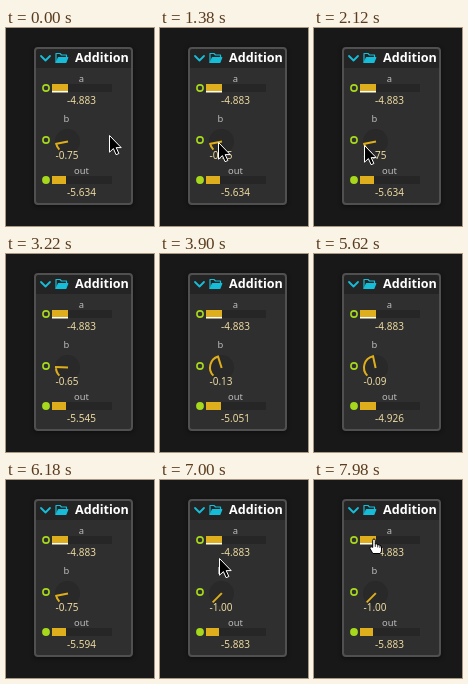
Recreate the animation shown at these times as an HTML page. Size 148x198 px, loop 8000 ms.

```html
<!DOCTYPE html>
<html lang="en">
<head>
<meta charset="utf-8">
<title>Addition node</title>
<style>
  html, body { margin: 0; width: 100%; height: 100%; overflow: hidden; background: #181818; }
  svg { display: block; width: 100vw; height: 100vh; }
  text { font: 10px "Noto Sans", "Open Sans", sans-serif; text-anchor: middle; }
  .label { font-size: 9.4px; fill: #bdbdbd; }
  .title { font-size: 12.6px; font-weight: 700; text-anchor: start; fill: #fff; }
  .value { fill: #ecd9a0; }
  .track { fill: #262626; }
  .fill { fill: #dfae1c; }
  .socket { fill: none; stroke: #a6d91b; stroke-width: 1.6; }
  .icon { fill: none; stroke: #16bdd8; stroke-width: 1.2; stroke-linejoin: round; stroke-linecap: round; }
  .solid { fill: #16bdd8; }
  .dial { fill: none; stroke: #dfae1c; stroke-width: 2; }
</style>
</head>
<body>
<svg viewBox="0 0 148 198">
  <defs>
    <filter id="blur" x="-20%" y="-20%" width="140%" height="140%">
      <feGaussianBlur stdDeviation="2.5"/>
    </filter>
  </defs>
  <rect width="148" height="198" fill="#181818"/>
  <rect x="28" y="20" width="99" height="158" rx="3" opacity=".45" filter="url(#blur)"/>
  <rect x="29" y="20" width="97" height="156" rx="3" fill="#2f2f2f"/>
  <path d="M29 40V22q0-2 2-2h93q2 0 2 2v18z" fill="#242424"/>
  <rect x="29" y="20" width="97" height="156" rx="3" fill="none" stroke="#505050" stroke-width="2"/>

  <path class="icon" style="stroke-width:1.8" d="M35 28l4.500 4.500 4.500-4.500"/>
  <path class="icon" d="M50 34.500v-9h4l1.500 1.500h5v2"/>
  <path class="icon solid" d="M50.200 34.500l2.300-5h9.300l-2 5z"/>
  <text class="title" x="69" y="34">Addition</text>

  <circle class="socket" cx="40" cy="60" r="3.100"/>
  <text class="label" x="75.500" y="54">a</text>
  <rect class="track" x="46" y="56" width="60" height="8"/>
  <rect class="fill" x="46" y="56" width="16" height="8"/>
  <rect x="46" y="63" width="16" height="1.500" fill="#fff"/>
  <text class="value" x="75.500" y="76">-4.883</text>

  <circle class="socket" cx="40" cy="112" r="3.100"/>
  <text class="label" x="60.500" y="94">b</text>
  <circle cx="61.500" cy="113.500" r="12.500" fill="#292929"/>
  <path class="dial" id="dial"/>
  <text class="value" id="bText" x="61" y="131"></text>

  <circle class="socket" cx="40" cy="152" r="3.100" style="fill:#a6d91b"/>
  <text class="label" x="75.500" y="146">out</text>
  <rect class="track" x="46" y="148" width="60" height="8"/>
  <rect class="fill" id="outBar" x="46" y="148" height="8"/>
  <text class="value" id="outText" x="75.500" y="168"></text>

  <path id="arrow" d="M.5 .5v16.700l3.900-3.600 2.700 6.100 2.800-1.200-2.700-5.900h5z"
        fill="#000" stroke="#fff" stroke-linejoin="round"/>
  <g id="hand" stroke="#000" stroke-linejoin="round" stroke-linecap="round">
    <path d="M-1.300 8V1.300Q-1.300 0 0 0t1.300 1.300V5q2.200-.8 2.400 .8 2-.6 2.200 .9 1.600-.2 1.600 1.300v3q0 2-1.300 3.500H-1.200L-4 9.500q-.4-1.600 .8-1.700z" fill="#fff"/>
    <path d="M1.300 5v2.500M3.700 6v2M5.900 7v1.500" stroke-width=".8"/>
  </g>
</svg>
<script>
const LOOP = 8000, A = -4.883, LAG = 40, CENTER = 61.5, MIDDLE = 113.5;
const $ = id => document.getElementById(id);
const clamp01 = p => Math.min(1, Math.max(0, p));
const progress = (t, from, to) => clamp01((t - from) / (to - from));
const ease = (p, soft) => p - soft * Math.sin(2 * Math.PI * p);
const mix = (a, b, p) => a + (b - a) * p;

// Pointer moves after the opening swing: start, end, x, y
const moves = [
  [700, 1000, 50, 112], [1220, 1380, 58, 114], [1640, 2120, 49.5, 117],
  [2520, 2640, 53, 116], [6700, 7260, 63, 48], [7660, 7980, 60, 59]
];

function pointer(t) {
  const p = progress(t, 0, 420);
  let x = 103 - 25 * p - 40 * Math.sin(Math.PI * p) ** 2;
  let y = 106 + 3 * p + 37 * Math.sin(2 * Math.PI * p);
  for (const [from, to, endX, endY] of moves) {
    const q = ease(progress(t, from, to), .08);
    x = mix(x, endX, q);
    y = mix(y, endY, q);
  }
  return [x, y];
}

// The dial is dragged up once, then down to its minimum.
function dialValue(t) {
  const up = mix(-.751, .471, ease(progress(t, 2880, 4900), .095));
  return mix(up, -1, ease(progress(t, 5060, 6460), .032));
}

const polar = (r, angle) =>
  `${(CENTER + r * Math.cos(angle)).toFixed(2)} ${(MIDDLE + r * Math.sin(angle)).toFixed(2)}`;

function drawDial(b) {
  const start = Math.PI * .75, sweep = (b + 1) * start, end = start + sweep;
  $('dial').setAttribute('d',
    `M${polar(11.5, start)}A11.5 11.5 0 ${+(sweep > Math.PI)} 1 ${polar(11.5, end)}` +
    `M${polar(-.5, end)}L${polar(12.5, end)}`);
}

function place(id, x, y, show) {
  $(id).setAttribute('transform', `translate(${Math.round(x)} ${Math.round(y)})`);
  $(id).style.display = show ? '' : 'none';
}

function render(t) {
  const b = dialValue(t), out = A + dialValue(t - LAG);
  drawDial(b);
  $('bText').textContent = b.toFixed(2);
  $('outText').textContent = out.toFixed(3);
  $('outBar').setAttribute('width', Math.ceil((out + 10) * 3));

  const [x, y] = pointer(t);
  const visible = t < 2920 || t >= 6700, onSlider = t > 7660 && y >= 55;
  place('arrow', x, y, visible && !onSlider);
  place('hand', x, y, visible && onSlider);
}

const begin = performance.now();
function tick() {
  render((performance.now() - begin) % LOOP);
  requestAnimationFrame(tick);
}
render(0);
requestAnimationFrame(tick);
</script>
</body>
</html>
```
